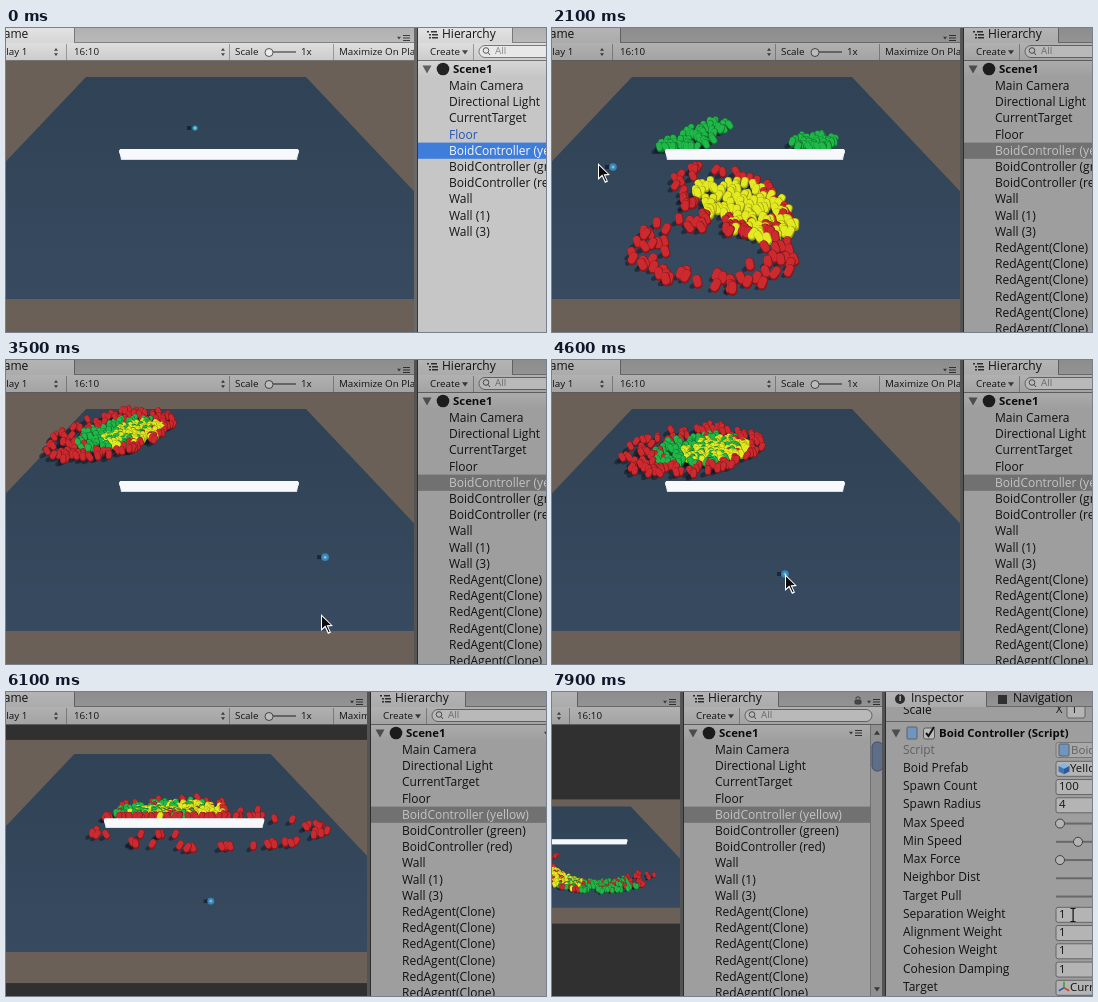
Write an HTML page with a canvas that moves like this. It is 540 px wide and 304 px high and loops after 8000 ms.

```html
<!DOCTYPE html>
<html lang="en">
<head>
<meta charset="utf-8">
<title>Boids editor</title>
<style>
html, body { margin: 0; width: 100%; height: 100%; overflow: hidden; background: #333; }
canvas { display: block; }
</style>
</head>
<body>
<canvas id="stage" width="540" height="304"></canvas>
<script>
const ctx = document.getElementById('stage').getContext('2d');
const FONT = '"Open Sans", "Noto Sans", sans-serif';
const LOOP = 8000, STEP = 100;
const PLAY = 4, SPAWN = 8, MERGE = 35, SPLIT = 57, CIRCLE = 67, END = 79;   // in steps
const ROW = 16.2, FIELD = 18.25, SMALL = 9.8;
let tint = 1;

const rgb = (r, g, b) => `rgb(${r * tint | 0},${g * tint | 0},${b * tint | 0})`;
const grey = v => rgb(v, v, v);
const mix = (a, b, u) => a + (b - a) * u;

function ease(t, from, to) {
  const u = Math.min(Math.max((t - from) / (to - from), 0), 1);
  return u * u * (3 - 2 * u);
}

// Eased values between [time, ...values] keys.
function track(keys, t) {
  let [, ...now] = keys[0];
  for (let i = 1; i < keys.length; i++) {
    const u = ease(t, keys[i - 1][0], keys[i][0]);
    now = now.map((v, j) => mix(v, keys[i][j + 1], u));
  }
  return now;
}

function random(seed) {
  return () => {
    seed = (seed + 0x6D2B79F5) | 0;
    let n = Math.imul(seed ^ seed >>> 15, 1 | seed);
    n = n + Math.imul(n ^ n >>> 7, 61 | n) ^ n;
    return ((n ^ n >>> 14) >>> 0) / 4294967296;
  };
}

// Flocks are ellipses (x, y, radius x, radius y, tilt): home, one pass, then the shared herd.
// After the split every boid runs along a loop around the wall, `arc` wide about the angle `lead`.
const RED = ['#85191d', '#cd2a2f'], GREEN = ['#11752f', '#20b848'], YELLOW = ['#a3a414', '#e4ea22'];
const HERD = [[MERGE, 115, 74, 41, 13, -.25], [SPLIT, 188, 106, 48, 17, 0]];
const FLOCKS = [
  { colors: GREEN, count: 60, home: [228, 68, 31, 12, 0], pass: [142, 110, 40, 11, -.4],
    side: -6, spread: 1, hollow: 0, join: SPLIT, lead: 1.15, arc: .4 },
  { colors: GREEN, count: 40, home: [230, 68, 30, 13, 0], pass: [262, 114, 22, 8, 0],
    side: -6, spread: 1, hollow: 0, join: SPLIT, lead: 1.2, arc: .35 },
  { colors: RED, count: 70, home: [318, 152, 62, 45, 0], pass: [162, 224, 84, 37, .05],
    side: -4, spread: 1.45, hollow: .5, join: SPLIT, lead: 1.3, arc: 1 },
  { colors: RED, count: 50, home: [322, 156, 68, 38, 0], pass: [180, 172, 62, 29, .35],
    side: -12, spread: 1.6, hollow: .7, join: 48, lead: 1.3, arc: 1 },
  { colors: YELLOW, count: 100, home: [60, 186, 54, 30, -.2], pass: [194, 180, 54, 25, .4],
    side: 12, spread: .75, hollow: 0, join: SPLIT, lead: 1.4, arc: .3 }
];
for (const f of FLOCKS) {
  const [x, y, rx, ry, tilt] = f.home;
  f.keys = [[SPAWN, x, y, rx * .75, ry * .75, tilt], [13, ...f.home], [21, ...f.pass],
    ...HERD.map(([t, x, y, rx, ry, a]) => [t, x + f.side, y, rx * f.spread, ry * f.spread, a])];
}
const rnd = random(41);
const BOIDS = FLOCKS.flatMap(flock => Array.from({ length: flock.count }, (_, i) => ({
  flock, r: Math.sqrt((i + rnd()) / flock.count), a: i * 2.4 + rnd() * .6,
  u: rnd() * 2 - 1, drift: rnd() - .5, lean: rnd() - .5
})));

function boidAt(b, t) {
  const f = b.flock;
  const [cx, cy, rx, ry, tilt] = track(f.keys, t);
  const gap = f.hollow * ease(t, 13, 21), r = mix(b.r, 1, gap);
  const a = b.a + Math.sin(t * .12 + b.u * 3) * .12;
  const px = Math.cos(a) * r * rx, py = Math.sin(a) * r * ry;
  const c = Math.cos(tilt), s = Math.sin(tilt);
  let x = cx + px * c - py * s, y = cy + px * s + py * c;

  const late = ease(t, CIRCLE - 3, END);
  const angle = Math.PI * (f.lead - .65 * late + b.u * f.arc * (1 - .5 * late));
  const open = 50 * ease(t, SPLIT, CIRCLE);
  const wide = 1 + b.drift * mix(.16, .45, late);
  const run = ease(t, f.join, f.join + 9);
  x = mix(x, 230 + 125 * wide * Math.cos(angle), run);
  y = mix(y, 118 + open + open * wide * Math.sin(angle) + late * 6, run);
  if (x > 106 && x < 300 && y > 119 && y < 139) y = y < 132 ? 119 : 139;
  return { b, x, y };
}

function drawBoid({ b, x, y }) {
  const w = 5.4 + (y - 60) * .019, lean = b.lean * w * .35;
  const [dark, light] = b.flock.colors;
  const capsule = (color, width, dx, top, bottom) => {
    ctx.strokeStyle = color;
    ctx.lineWidth = width;
    ctx.beginPath();
    ctx.moveTo(x + dx + lean, y + top * w);
    ctx.lineTo(x + dx - lean, y + bottom * w);
    ctx.stroke();
  };
  capsule(dark, w, 0, -.28, .32);
  capsule(light, w * .85, -w * .06, -.3, .16);
}

function poly(color, ...pts) {
  ctx.fillStyle = color;
  ctx.beginPath();
  for (let i = 0; i < pts.length; i += 2) ctx.lineTo(pts[i], pts[i + 1]);
  ctx.closePath();
  ctx.fill();
}
function rect(color, x, y, w, h) {
  ctx.fillStyle = color;
  ctx.fillRect(x, y, w, h);
}
function disc(color, x, y, r) {
  ctx.fillStyle = color;
  ctx.beginPath();
  ctx.arc(x, y, r, 0, 7);
  ctx.fill();
}
function round(fill, edge, x, y, w, h, r) {
  ctx.beginPath();
  ctx.roundRect(x, y, w, h, r);
  ctx.fillStyle = fill;
  ctx.fill();
  ctx.strokeStyle = edge;
  ctx.lineWidth = 1;
  ctx.stroke();
}
function shade(top, bottom, x, y, w, h) {
  const g = ctx.createLinearGradient(0, y, 0, y + h);
  g.addColorStop(0, grey(top));
  g.addColorStop(1, grey(bottom));
  rect(g, x, y, w, h);
}
function text(s, x, y, color = grey(22), size = 12, weight = 400) {
  ctx.font = `${weight} ${size}px ${FONT}`;
  ctx.fillStyle = color;
  ctx.fillText(s, x, y);
}
function clipped(x, y, w, h, draw) {
  ctx.save();
  ctx.beginPath();
  ctx.rect(x, y, w, h);
  ctx.clip();
  draw();
  ctx.restore();
}

// Interface parts
const bold = (s, x, y) => text(s, x, y, grey(15), 11.4, 700);
const small = (s, x, y) => text(s, x, y, grey(22), SMALL);
const down = (x, y, r = 3) => poly(grey(70), x - r, y - r * .6, x + r, y - r * .6, x, y + r * .8);
const up = (x, y, r = 3) => poly(grey(70), x - r, y + r * .6, x + r, y + r * .6, x, y - r * .8);
const fold = (x, y) => poly(grey(95), x - 4.5, y - 3.5, x + 4.5, y - 3.5, x, y + 4.5);
const field = (x, y, w) => round(grey(226), grey(125), x, y - 7.5, w, 15, 2);
const divider = x => rect(grey(150), x, 16, 1, 16);
function updown(x, y) { up(x, y - 2.5, 2); down(x, y + 2.5, 2); }
function menu(x, y) {
  down(x - 4, y, 2);
  for (let i = -1; i < 2; i++) rect(grey(60), x, y + i * 2.5 - .5, 7, 1);
}
function tabBar(x, w, tab) {
  shade(176, 186, x, 0, w, 15);
  shade(226, 214, x, 0, tab, 15);
  rect(grey(120), x + tab, 0, 1, 14);
  rect(grey(130), x + tab, 14, w - tab, 1);
}
function toolbar(x, w) {
  shade(222, 204, x, 15, w, 17);
  rect(grey(115), x, 32, w, 1);
}
function gutter(x) {
  rect(grey(105), x - 4, 0, 4, 304);
  rect(grey(55), x - 1, 0, 1, 304);
}
function check(x, y) {
  round(grey(235), grey(110), x - 5.5, y - 5, 11, 11, 2);
  ctx.strokeStyle = grey(25);
  ctx.lineWidth = 2;
  ctx.beginPath();
  ctx.moveTo(x - 3, y);
  ctx.lineTo(x - .5, y + 3);
  ctx.lineTo(x + 5, y - 6);
  ctx.stroke();
}
function axes(x, y) {
  ctx.lineWidth = 1.6;
  ['#c8442c', '#3458b8', '#4a9a30'].forEach((color, i) => {
    const a = Math.PI * (1 / 6 + i * 2 / 3);
    ctx.strokeStyle = color;
    ctx.beginPath();
    ctx.moveTo(x, y);
    ctx.lineTo(x + 6 * Math.cos(a), y + 6 * Math.sin(a));
    ctx.stroke();
  });
}
function cube(x, y, r, top, left, right) {
  const h = r / 2;
  poly(top, x, y - r, x + r, y - h, x, y, x - r, y - h);
  poly(left, x - r, y - h, x, y, x, y + r, x - r, y + h);
  poly(right, x + r, y - h, x, y, x, y + r, x + r, y + h);
}
const scriptIcon = (x, y) => round('#6f96c0', grey(120), x - 5, y - 6, 10, 12, 1);

const TARGET = [[8, 189, 100], [13, 242, 201], [21, 61, 139], [33, 325, 196], [46, 233, 214]];

function drawTarget(t) {
  const [x, y] = track(TARGET, t);
  rect('rgba(10,18,28,.6)', x - 8, y - 2, 4, 4);
  disc(t < SPAWN ? '#2a9db0' : '#3a84b8', x, y, t < SPAWN ? 2.6 : 3.8);
  disc('#6cc4d8', x, y, 1.5);
}

function drawScene(t) {
  rect('#6a6058', -28, 33, 436, 273);
  const g = ctx.createLinearGradient(0, 49, 0, 271);
  g.addColorStop(0, '#304255');
  g.addColorStop(1, '#374a5f');
  poly(g, 80, 49, 300, 49, 510, 271, -131, 271);
  drawTarget(t);
  const live = t < SPAWN ? [] : BOIDS.map(b => boidAt(b, t)).sort((a, b) => a.y - b.y);
  ctx.fillStyle = 'rgba(12,20,30,.5)';
  for (const { x, y } of live) {
    ctx.beginPath();
    ctx.ellipse(x - 4, y + 4, 4.5, 2.4, -.5, 0, 7);
    ctx.fill();
  }
  ctx.lineCap = 'round';
  live.filter(p => p.y < 128).forEach(drawBoid);
  poly('#d5dbe3', 113, 122, 293, 122, 291, 132, 115, 132);
  poly('#f7f9fc', 114, 121, 292, 121, 293, 124, 290, 131, 116, 131, 113, 124);
  live.filter(p => p.y >= 128).forEach(drawBoid);
  ctx.lineCap = 'butt';
}

function drawGame(t, split) {
  const left = -28, w = split - 4 - left, s = w / 436, mid = 169.5;
  clipped(left, 0, w, 304, () => {
    rect('#303030', left, 32, w, 272);
    ctx.save();
    ctx.translate(left, mid);
    ctx.scale(s, s);
    ctx.translate(-left, -mid);
    clipped(left, 33, 436, 273, () => drawScene(t));
    ctx.restore();
    tabBar(left, w, 68 - left);
    toolbar(left, w);
    text('Game', -11, 7);
    menu(left + w - 11, 10);
    small('Display 1', -20, 24);
    updown(50, 24);
    small('16:10', 68, 24);
    updown(217, 24);
    small('Scale', 229, 24);
    rect(grey(125), 259, 23, 31, 2);
    round(grey(235), grey(85), 259, 20.5, 8, 8, 4);
    small('1x', 295, 24);
    small('Maximize On Play', 333, 24);
    [60, 223, 327].forEach(divider);
  });
}

const ITEMS = ['Main Camera', 'Directional Light', 'CurrentTarget', 'Floor', 'BoidController (yellow)',
  'BoidController (green)', 'BoidController (red)', 'Wall', 'Wall (1)', 'Wall (3)'];

function drawHierarchy(t, x, w) {
  const play = t >= PLAY, end = x + w;
  gutter(x);
  clipped(x, 0, w - 2, 304, () => {
    rect(grey(198), x, 0, w, 304);
    tabBar(x, w, 94);
    for (let i = 0; i < 3; i++) {
      rect(grey(55), x + 9 + (i ? 2 : 0), 3 + i * 3, 2, 1.5);
      rect(grey(55), x + 13 + (i ? 1 : 0), 3 + i * 3, 6, 1.5);
    }
    text('Hierarchy', x + 24, 7);
    round(grey(90), grey(70), end - 31, 8, 6, 4, 1);
    ctx.beginPath();
    ctx.arc(end - 28, 7, 2.2, Math.PI, 0);
    ctx.stroke();
    menu(end - 13, 10);
    toolbar(x, w);
    small('Create', x + 12, 24);
    down(x + 47, 24);
    divider(x + 55);
    round(grey(232), grey(120), x + 61, 17.5, w - 75, 12, 6);
    ctx.strokeStyle = grey(90);
    ctx.beginPath();
    ctx.arc(x + 68, 22.5, 2.8, 0, 7);
    ctx.moveTo(x + 70, 24.5);
    ctx.lineTo(x + 72, 27);
    ctx.stroke();
    text('All', x + 77, 23.5, grey(135), SMALL);
    shade(214, 198, x, 33, w - 16, 16);
    fold(x + 9, 41);
    disc(grey(35), x + 25, 41, 6.3);
    bold('Scene1', x + 35, 41.8);
    menu(end - 31, 41);
    const names = ITEMS.concat(t < SPAWN ? [] : Array(6).fill('RedAgent(Clone)'));
    names.forEach((name, i) => {
      const y = 58.8 + i * ROW;
      let color = grey(22);
      if (name.includes('yellow')) {
        rect(play ? grey(142) : '#3f7ddb', x, y - 9, w - 16, ROW);
        color = grey(245);
      } else if (name === 'Floor' && !play) color = '#2456b0';
      text(name, x + 31, y, color);
    });
    rect(grey(180), end - 16, 33, 14, 271);
    rect(grey(140), end - 16, 33, 1, 271);
    up(end - 9, 41);
    down(end - 9, 297);
    round(rgb(118, 138, 170), rgb(80, 98, 130), end - 14, 50, 11, 29, 5);
  });
}

// A number is the place of a slider knob.
const FIELDS = [['Boid Prefab', 'YellowAgent'], ['Spawn Count', '100'], ['Spawn Radius', '4'], ['Max Speed', 4],
  ['Min Speed', 22], ['Max Force', 4], ['Neighbor Dist', 60], ['Target Pull', 60], ['Separation Weight', '1'],
  ['Alignment Weight', '1'], ['Cohesion Weight', '1'], ['Cohesion Damping', '1'], ['Target', 'CurrentTarget']];

function drawInspector(x, scroll) {
  const col = x + 170;
  gutter(x);
  rect(grey(198), x, 0, 300, 304);
  clipped(x, 15, 300, 289, () => {
    ctx.translate(0, -scroll);
    cube(x + 19, 29, 11, '#d8b440', '#4c9c48', '#3a76b8');
    check(x + 49, 26);
    field(x + 62, 26, 220);
    text('BoidController (yellow)', x + 65, 27);
    text('Tag', x + 39, 47.5, grey(22), 11);
    field(x + 62, 47, 140);
    text('Untagged', x + 67, 47.5, grey(22), 10);
    rect(grey(125), x, 61, 300, 1);
    fold(x + 10, 71);
    axes(x + 26, 72);
    bold('Transform', x + 53, 72);
    ['Position', 'Rotation', 'Scale'].forEach((name, i) => {
      const y = 88 + i * FIELD;
      text(name, x + 17, y);
      text('X', col, y, grey(22), 11);
      field(col + 11, y, 18);
      text(i === 2 ? '1' : '0', col + 15, y, grey(22), 11);
    });
    rect(grey(125), x, 135, 300, 1);
    fold(x + 10, 147);
    scriptIcon(x + 26, 147);
    check(x + 43, 147);
    bold('Boid Controller (Script)', x + 53, 147.8);
    text('Script', x + 17, 164.5, grey(120));
    round(grey(212), grey(150), col, 156.5, 130, 15, 2);
    scriptIcon(col + 8, 164);
    text('BoidController', col + 15, 164.5, grey(120), 11.5);
    FIELDS.forEach(([name, value], i) => {
      const y = 182.8 + i * FIELD;
      text(name, x + 17, y);
      if (typeof value === 'number') {
        rect(grey(130), col, y - 1, 100, 2);
        round(grey(225), grey(80), col + value - 4.5, y - 4.5, 9, 9, 4.5);
        return;
      }
      field(col, y, 130);
      if (name === 'Boid Prefab') cube(col + 8, y, 5.5, '#86b4e0', '#3f74b4', '#2c5a98');
      if (name === 'Target') axes(col + 8, y);
      text(value, col + (value.length > 3 ? 14 : 3), y, grey(22), 11.5);
    });
  });
  tabBar(x, 300, 100);
  disc(grey(55), x + 14, 7, 5);
  text('i', x + 12.7, 7, grey(240), 9, 700);
  text('Inspector', x + 25, 7);
  rect(grey(60), x + 112, 3, 9, 9);
  text('Navigation', x + 127, 7);
}

const POINTER = [[12, 240, 206], [21, 46, 135], [35, 315, 254], [46, 233, 214], [52, 455, 190],
  [57, 508, 140], [59, 560, 150]];
const RETURN = [[71, 500, 170], [76, 521, 223]];

function arrow([x, y]) {
  ctx.save();
  ctx.translate(x, y);
  poly('#fff', 0, 0, 0, 17, 4, 13.5, 7, 20, 10, 18.5, 7.2, 12.5, 12, 12);
  poly('#0c0c0c', 1, 2.5, 1, 14.5, 4.3, 11.5, 7.6, 18.3, 8.6, 17.8, 5.6, 11.2, 9.8, 11);
  ctx.restore();
}
function drawPointer(t) {
  if (t >= SPAWN && t < 59) arrow(track(POINTER, t));
  else if (t >= 71 && t < 76) arrow(track(RETURN, t));
  else if (t >= 76) {
    rect('#111', 520.5, 217, 1.2, 12);
    [216, 229].forEach(y => rect('#111', 518.5, y, 5, 1));
  }
}

function frame(now) {
  const t = Math.floor(now % LOOP / STEP);
  tint = t >= PLAY ? .8 : 1;
  const split = Math.round(mix(412, 175, ease(t, 59, 66)));
  const width = Math.round(mix(210, 202, ease(t, 67, 70)));
  const pan = Math.round(mix(0, 43, ease(t, 65.2, 70)));
  const scroll = Math.round(106 * ease(t, 71, 75));
  ctx.setTransform(1, 0, 0, 1, -pan, 0);
  ctx.textBaseline = 'middle';
  drawGame(t, split);
  drawHierarchy(t, split, width);
  drawInspector(split + width, scroll);
  ctx.setTransform(1, 0, 0, 1, 0, 0);
  drawPointer(t);
}

const start = performance.now();
function loop() {
  frame(performance.now() - start);
  requestAnimationFrame(loop);
}
loop();
</script>
</body>
</html>
```
